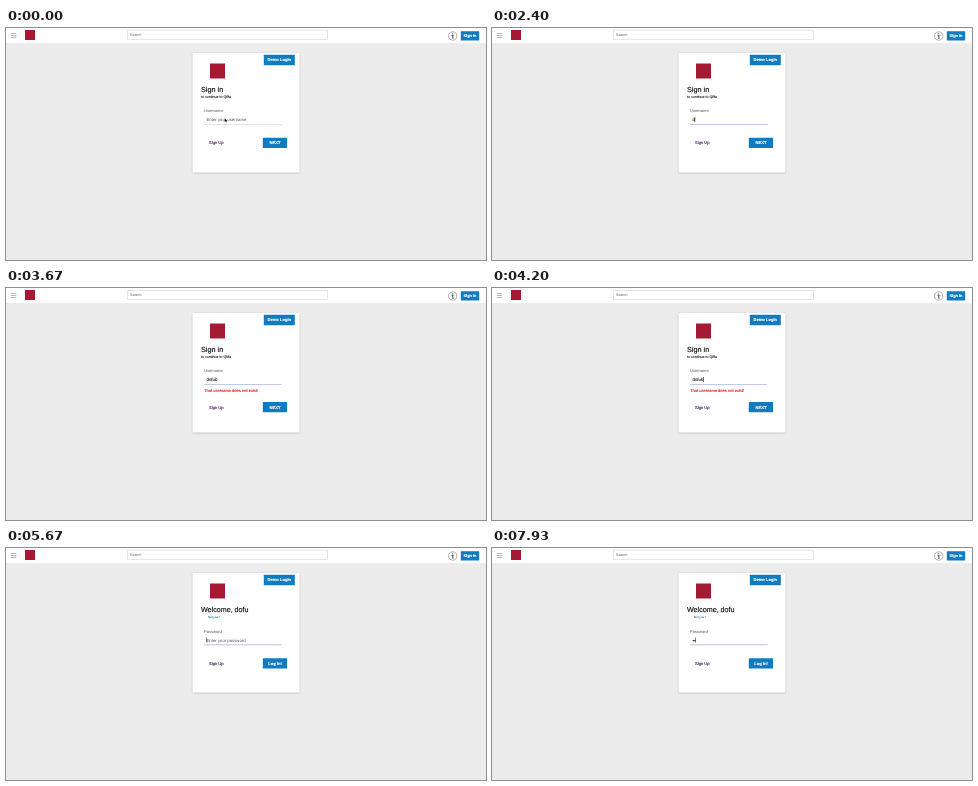
Write an HTML page with a canvas that moves like this. It is 480 by 232 pixels and loops after 8000 ms.

```html
<!DOCTYPE html>
<html lang="en">
<head>
<meta charset="utf-8">
<title>Sign in</title>
<style>
html, body { margin: 0; width: 100%; height: 100%; overflow: hidden; background: #ececec; }
canvas { display: block; width: 480px; height: 232px; }
</style>
</head>
<body>
<canvas id="stage"></canvas>
<script>
const W = 480, H = 232, LOOP = 8000;
const BLUE = '#107bbf', RED = '#a51a32';
const canvas = document.getElementById('stage');
const ctx = canvas.getContext('2d');
const dpr = window.devicePixelRatio || 1;
canvas.width = W * dpr;
canvas.height = H * dpr;
ctx.scale(dpr, dpr);

const USER = 'dofub', BRAND = 'Qilfa';

// Key presses: [time, characters in the field]
const userKeys = [[2330, 1], [2600, 2], [2730, 3], [2800, 4], [3070, 5], [5070, 4]];
const passKeys = [[7870, 1], [7930, 2]];
// The caret flips at each of these times, starting hidden
const caretFlips = [870, 1470, 1930, 3600, 4070, 4600, 5070, 5600, 5670, 6200, 6670, 7200, 7670];

const typed = (keys, t) => keys.reduce((n, [at, len]) => t >= at ? len : n, 0);
const caretOn = t => caretFlips.filter(at => t >= at).length % 2 === 1;

function box(x, y, w, h, fill, r = 0) {
  ctx.fillStyle = fill;
  ctx.beginPath();
  ctx.roundRect(x, y, w, h, r);
  ctx.fill();
}

function text(str, x, y, size, fill, { bold = false, align = 'left', heavy = 0 } = {}) {
  ctx.font = `${bold ? 'bold ' : ''}${size}px "Liberation Sans", Arial, sans-serif`;
  ctx.textRendering = 'geometricPrecision';
  ctx.textAlign = align;
  ctx.fillStyle = fill;
  ctx.fillText(str, x, y);
  if (heavy) {
    ctx.strokeStyle = fill;
    ctx.lineWidth = heavy;
    ctx.strokeText(str, x, y);
  }
  return ctx.measureText(str).width;
}

function button(label, x, y, w, h, size = 4.1) {
  box(x, y, w, h, BLUE, 0.5);
  text(label, x + w / 2, y + h / 2 + size * 0.36, size, '#fff', { bold: true, align: 'center', heavy: 0.15 });
}

function header() {
  box(0, 0, W, 15.4, '#fff');
  box(0, 15.4, W, 0.6, '#e4e4e4');
  for (let i = 0; i < 3; i++) box(4.8, 5.3 + i * 2, 5.6, 0.6, '#888');
  box(19, 2, 10, 10, RED);
  box(121, 2.2, 201, 9.6, '#d4d4d4', 0.8);
  box(121.6, 2.8, 199.8, 8.4, '#fff', 0.5);
  text('Search', 124, 8.4, 3.6, '#555');

  ctx.strokeStyle = '#777';
  ctx.lineWidth = 0.6;
  ctx.beginPath();
  ctx.arc(446.7, 8, 4.1, 0, Math.PI * 2);
  ctx.stroke();
  box(446, 5.2, 1.4, 1.4, '#666', 0.7);
  box(444.9, 6.9, 3.6, 0.6, '#777');
  box(446, 7, 1.4, 2.2, '#666');
  box(446, 9, 0.5, 2, '#666');
  box(446.9, 9, 0.5, 2, '#666');
  button('Sign In', 454.8, 3.2, 18.4, 9.4, 3.9);
}

function card() {
  ctx.save();
  ctx.shadowColor = 'rgba(0,0,0,.2)';
  ctx.shadowBlur = 2 * dpr;
  ctx.shadowOffsetY = 0.6 * dpr;
  box(186.5, 25, 107, 119.6, '#fff', 0.8);
  ctx.restore();
  box(204, 35.5, 15, 15, RED);
  button('Demo Login', 257.8, 26.8, 31, 10.4);
}

function arrow(x, y) {
  const pts = [[0, 0], [0, 3.5], [0.8, 2.8], [1.4, 4.1], [2, 3.8], [1.4, 2.6], [2.5, 2.5]];
  ctx.beginPath();
  pts.forEach(([dx, dy]) => ctx.lineTo(x + dx, y + dy));
  ctx.closePath();
  ctx.fillStyle = '#000';
  ctx.fill();
}

function beam(x, y) {
  box(x - 0.25, y, 0.5, 5, '#444');
  box(x - 0.7, y, 1.4, 0.4, '#777');
  box(x - 0.7, y + 4.6, 1.4, 0.4, '#777');
}

function field(label, hint, value, dy, t) {
  text(label, 198, 84.3 + dy, 4.05, '#555');
  let end = 0;
  if (value) end = text(value, 200.5, 93 + dy, 4.35, '#111', { heavy: 0.08 });
  else text(hint, 200.5, 93 + dy, 4.28, '#555');
  if (caretOn(t)) box(200.2 + end, 89 + dy, 0.6, 5, '#222');
}

function userForm(t) {
  const failed = t >= 3670;
  const shift = failed ? 4.1 : 0;
  text('Sign in', 195, 64.2, 7.25, '#111', { heavy: 0.15 });
  text('to continue to ' + BRAND, 195, 69.7, 3.6, '#111', { heavy: 0.08 });
  field('Username', 'Enter your username', USER.slice(0, typed(userKeys, t)), 0, t);

  const line = t < 870 ? '#dcdcdc' : t < 930 ? '#ccccea' : failed ? '#a9b8e0' : '#b4b2e4';
  box(198, 96, failed ? 77.2 : 78, 0.7, line);
  if (failed) text('That username does not exist!', 198, 104, 4.02, '#d3142a', { heavy: 0.1 });
  text('Sign Up', 203, 116.4 + shift, 4.1, t < 4070 ? '#43195f' : '#1c1c52', { heavy: 0.1 });
  button('NEXT', 256.8, 109.8 + shift, 24.3, 10.3);

  if (t < 870) arrow(218.8, 90.5);
  else if (t < 2330) beam(218.5, 88.6);
}

function passForm(t) {
  const count = typed(passKeys, t);
  text('Welcome, ' + USER.slice(0, 4), 195, 64.4, 7.15, '#111', { heavy: 0.15 });
  text('Not you?', 202, 69.7, 2.75, '#1768ad', { bold: true });
  field('Password', 'Enter your password', '•'.repeat(count), 0.6, t);
  box(198, 96.6, 77.6, 0.7, '#acace4');
  text('Sign Up', 203, 116.9, 4.1, '#1c1c52', { heavy: 0.1 });
  button('Log In!', 256.8, 110.3, 24.3, 10.3);
}

function draw(now) {
  const t = now % LOOP;
  box(0, 0, W, H, '#ececec');
  header();
  card();
  (t < 5670 ? userForm : passForm)(t);
}

const start = performance.now();
function tick() {
  draw(performance.now() - start);
  requestAnimationFrame(tick);
}
tick();
</script>
</body>
</html>
```
